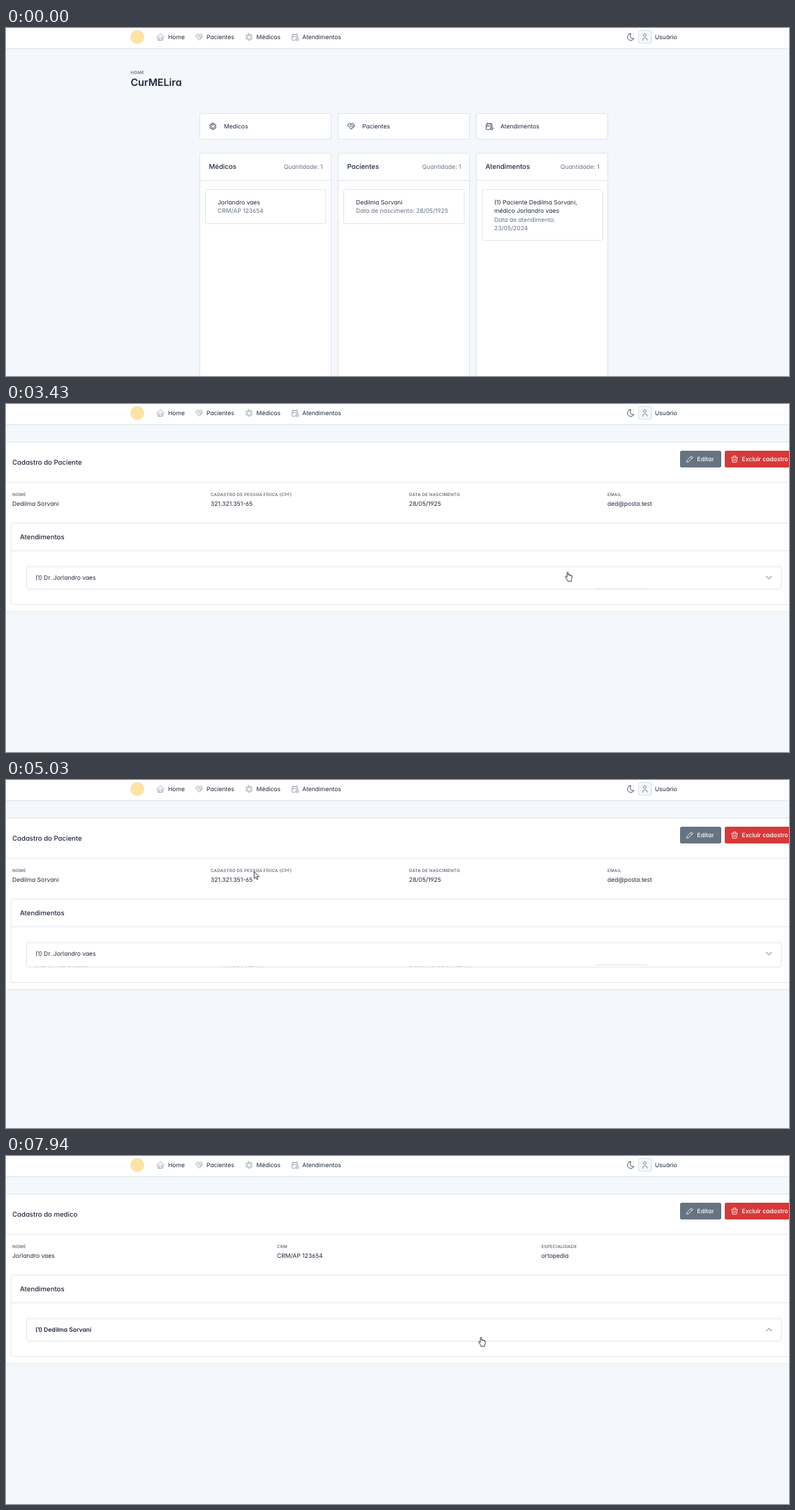
These frames come from a looping animation (1121 by 499 pixels, 8 s). An HTML page:

```html
<!DOCTYPE html>
<html lang="pt-BR">
<head>
<meta charset="utf-8">
<title>CurMELira</title>
<style>
  html, body { margin: 0; width: 100%; height: 100%; overflow: hidden; background: #f4f7fb; }
  svg { display: block; width: 1121px; height: 499px; }
  text {
    font-family: Inter, "Open Sans", sans-serif;
    font-feature-settings: "cv03", "cv04", "cv11";
    text-rendering: geometricPrecision;
    white-space: pre;
  }
</style>
</head>
<body>
<svg id="stage" viewBox="0 0 1121 499" xmlns="http://www.w3.org/2000/svg"></svg>
<script>
const INK = '#1d273b', MUTED = '#667382', EDGE = '#dfe4ea', RULE = '#b3b3b3';
const BODY = 8.54, HEAD = 9.6, SMALL = 6.1;
const DOCTOR = 'Jorlandro vaes', PATIENT = 'Dedilma Sorvani';
const LOOP = 8000;

// Six-armed medical star on a 24 unit grid
function starPath() {
  const pts = [];
  const at = (r, a) => `${(12 + r * Math.cos(a)).toFixed(2)} ${(12 + r * Math.sin(a)).toFixed(2)}`;
  for (let k = 0; k < 6; k++) {
    const a = Math.PI * (k / 3 - 0.5);
    pts.push(at(9.2, a - 0.22), at(9.2, a + 0.22), at(4, a + Math.PI / 6));
  }
  return 'M' + pts.join('L') + 'Z';
}

const ICONS = {
  home: 'M5 12H3l9-9 9 9h-2M5 12v7a2 2 0 0 0 2 2h10a2 2 0 0 0 2-2v-7M9 21v-6a2 2 0 0 1 2-2h2a2 2 0 0 1 2 2v6',
  heart: 'M19.5 12.57 12 20l-7.5-7.43A5 5 0 1 1 12 6a5 5 0 1 1 7.5 6.57M12 6 8.7 9.3a1 1 0 0 0 0 1.4l.55.55c.7.7 1.8.7 2.5 0l1-1a3.2 3.2 0 0 1 4.5 0l2.25 2.25M12.5 15.5l2 2M15 13l2 2',
  star: starPath(),
  calendar: 'M11.8 21H5a2 2 0 0 1-2-2V7a2 2 0 0 1 2-2h12a2 2 0 0 1 2 2v4M14 18a4 4 0 1 0 8 0a4 4 0 1 0-8 0M15 3v4M7 3v4M3 11h16M18 16.5V18l1 1',
  moon: 'M12 3h.4a7.5 7.5 0 0 0 7.9 12.45A9 9 0 1 1 12 3z',
  user: 'M8 7a4 4 0 1 0 8 0a4 4 0 0 0-8 0M6 21v-2a4 4 0 0 1 4-4h4a4 4 0 0 1 4 4v2',
  eye: 'M10 12a2 2 0 1 0 4 0a2 2 0 0 0-4 0M21 12c-2.4 4-5.4 6-9 6s-6.6-2-9-6c2.4-4 5.4-6 9-6s6.6 2 9 6',
  pencil: 'M4 20h4L18.5 9.5a2.83 2.83 0 1 0-4-4L4 16v4M13.5 6.5l4 4',
  trash: 'M4 7h16M10 11v6M14 11v6M5 7l1 12a2 2 0 0 0 2 2h8a2 2 0 0 0 2-2l1-12M9 7V4a1 1 0 0 1 1-1h4a1 1 0 0 1 1 1v3',
  chevron: 'M6 9l6 6 6-6'
};

// y is the middle of the capitals
const text = (x, y, str, { size = BODY, weight = 400, fill = INK, anchor = 'start', extra = '' } = {}) =>
  `<text x="${x}" y="${(y + size * 0.36).toFixed(2)}" font-size="${size}" font-weight="${weight}" fill="${fill}" text-anchor="${anchor}" ${extra}>${str}</text>`;
const label = (x, y, str) =>
  text(x, y, str, { size: SMALL, weight: 600, fill: MUTED, extra: 'letter-spacing=".24"' });
const head = (x, y, str) => text(x, y, str, { size: HEAD, weight: 500 });
const rect = (x, y, x2, y2, fill, stroke = 'none', r = 0, extra = '') =>
  `<rect x="${x}" y="${y}" width="${x2 - x}" height="${y2 - y}" rx="${r}" fill="${fill}" stroke="${stroke}" ${extra}/>`;
const line = (x, y, x2, stroke = EDGE, extra = '') =>
  `<path d="M${x} ${y}H${x2}" stroke="${stroke}" ${extra}/>`;
const icon = (name, cx, cy, color = INK, size = 12.4, extra = '') =>
  `<g transform="translate(${cx} ${cy}) scale(${size / 24})" fill="none" stroke="${color}" stroke-width="1.6" stroke-linecap="round" stroke-linejoin="round"><path d="${ICONS[name]}" transform="translate(-12 -12)" ${extra}/></g>`;
const card = (x, y, x2, y2, extra = '') => rect(x, y, x2, y2, '#fff', EDGE, 2.5, extra);
const button = (x, x2, color, str, tx, ic) =>
  rect(x, 67, x2, 91, color, 'none', 2.5) + (ic ? icon(ic, x + 14, 79, '#fff') : '') +
  text(tx, 79, str, { weight: 500, fill: '#fff' });
const viewButton = (x, y, x2) =>
  rect(x, y, x2, y + 24, '#fff', '#d9dee5', 2.5) + icon('eye', x + 14, y + 12) +
  text(x + 24.7, y + 12, 'Visualizar', { weight: 500 });

function navbar() {
  const links = [['home', 221, 232, 'Home'], ['heart', 276.5, 287, 'Pacientes'],
    ['star', 348, 358.5, 'Médicos'], ['calendar', 414, 424.3, 'Atendimentos']];
  return rect(0, 0, 1121, 29, '#fff') + line(0, 29.5, 1121) +
    '<circle cx="188" cy="13" r="10" fill="#fce2a4"/>' +
    links.map(([ic, cx, x, str]) => icon(ic, cx, 13, '#8b94a2') + text(x, 13, str)).join('') +
    icon('moon', 894.5, 13) + rect(905.5, 3.5, 924, 22, '#f4f7fb', '#d9dfe7', 2.5) +
    icon('user', 914.7, 13, MUTED) + text(929, 13, 'Usuário');
}

function homePage() {
  const cols = [
    ['star', 'Medicos', 'Médicos', 281, [DOCTOR], ['CRM/AP 123654']],
    ['heart', 'Pacientes', 'Pacientes', 281, [PATIENT], ['Data de nascimento: 28/05/1925']],
    ['calendar', 'Atendimentos', 'Atendimentos', 305, [`(1) Paciente ${PATIENT},`, `médico ${DOCTOR}`],
      ['Data de atendimento:', '23/05/2024']]
  ];
  return label(178.5, 64, 'HOME') + text(178.5, 78, 'CurMELira', { size: 14.3, weight: 600 }) +
    cols.map(([ic, link, title, bottom, main, sub], i) => {
      const x = 277.5 + 198 * i;
      const rows = main.map(s => [s, INK]).concat(sub.map(s => [s, MUTED]));
      return card(x, 122.5, x + 188, 159.5) + icon(ic, x + 18.7, 141) + text(x + 34.5, 141, link) +
        card(x, 179.5, x + 188, 520) + line(x, 218.5, x + 188) + head(x + 13, 199, title) +
        text(x + 176, 199, 'Quantidade: 1', { fill: MUTED, anchor: 'end' }) +
        card(x + 8, 231.5, x + 180.5, bottom - 0.5) +
        rows.map(([s, c], k) => text(x + 25.5, 250.2 + 12.2 * k, s, { fill: c })).join('');
    }).join('');
}

function listFrame(title, bottom, bx, add) {
  return rect(-2, 54.5, 1130, bottom, '#fff', EDGE) + line(0, 103.5, 1121) + head(9, 79, title) +
    button(bx, 1135, '#2fb344', add, bx + 10.3);
}

const rowText = (xs, y, cells, weight) =>
  cells.map((s, i) => text(xs[i], y, s, { weight })).join('');

function plainList(title, bx, add, xs, names, cells) {
  return listFrame(title, 192.5, bx, add) + rect(12, 143, 1121, 177, '#f8f8f8') +
    line(12, 143, 1121, RULE) + rowText(xs, 130.5, names, 700) + rowText(xs, 160.2, cells, 400) +
    viewButton(1046.5, 148.5, 1130);
}

function richList(title, bx, add, xs, names, cells, split, sorts) {
  const arrows = sorts.map((x, i) => i
    ? `<path d="M${x - 2.8} 158l2.8-4.2 2.8 4.2zM${x - 2.8} 159.8l2.8 4.2 2.8-4.2z" fill="#d6d6d8"/>`
    : `<path d="M${x - 3.2} 158.4l3.2-5 3.2 5z" fill="#555a66"/>`).join('');
  const pages = [[913, 'Primeiro'], [966, 'Anterior'], [1040.5, 'Próximo'], [1092.5, 'Último']];
  return listFrame(title, 252.5, bx, add) +
    text(12, 132, 'Exibir') + rect(37, 122.5, 72.5, 140, '#fff', '#999', 2) + text(41.5, 132, '10') +
    '<path d="M62.6 130l2.7 2.7 2.7-2.7" fill="none" stroke="#222" stroke-width="1.3"/>' +
    text(75, 132, 'resultados por página') + text(957.5, 131.3, 'Pesquisar') +
    rect(999.5, 121.5, 1130, 141, '#fff', '#aaa', 2) + text(1003, 131.3, 'Buscar registros', { fill: '#7c8088' }) +
    rowText(xs, 159, names, 700) + arrows +
    rect(12, 172, 1121, 206, '#f9f9f9', 'none', 0, 'class="row"') +
    rect(12, 172, split, 206, '#f1f1f1', 'none', 0, 'class="cell"') +
    line(12, 171.5, 1121, RULE) + line(12, 206.5, 1121, RULE) +
    rowText(xs, 189, cells, 400) + viewButton(1046.5, 177, 1130) +
    text(12, 223.5, 'Mostrando de 1 até 1 de 1 registros', { fill: '#333' }) +
    pages.map(([x, s]) => text(x, 223.5, s, { fill: '#929292' })).join('') +
    rect(1009, 213, 1030, 234, 'url(#page)', '#aaa', 1.5) +
    text(1019.5, 223.5, '1', { anchor: 'middle', fill: '#333' });
}

function detailPage(title, fields, item, body) {
  return rect(-2, 54.5, 1130, 297.5, '#fff', EDGE, 0, 'class="sheet"') + line(0, 112, 1121) + head(9, 83.5, title) +
    button(965, 1024, MUTED, 'Editar', 989.5, 'pencil') +
    button(1029, 1135, '#d63939', 'Excluir cadastro', 1053.5, 'trash') +
    fields.map(([x, k, v]) => label(x, 129.5, k) + text(x, 142.8, v)).join('') +
    card(7, 170.5, 1140, 287.5, 'class="outer"') + head(20, 191, 'Atendimentos') + line(7, 210.5, 1121) +
    card(29.5, 233, 1110, 265.5, 'class="item"') +
    text(42, 249, item, { extra: 'class="title"' }) + icon('chevron', 1092.3, 249, '#4a5568', 14, 'class="arrow"') +
    `<g clip-path="url(#fold)">${body}</g>`;
}

const visit = [[42, 'DATA DO ATENDIMENTO', '23/05/2024'], [309.5, 'NOME DO MÉDICO', DOCTOR],
  [577, 'ESPECIALIDADE DO MÉDICO', 'ortopedia']]
  .map(([x, k, v]) => label(x, 269.7, k) + text(x, 282.5, v)).join('') + viewButton(844.5, 265, 919.5);

const patientList = ['Lista de pacientes', 1010.5, 'Adicionar novo paciente'];
const doctorList = ['Lista de medicos', 1015.5, 'Adicionar novo Médico'];
const patientHead = ['Nome', 'CPF', 'Email', 'Data de nascimento'];
const patientRow = [PATIENT, '321.321.351-65', 'ded@posta.test', '28/05/1925'];
const doctorHead = ['Nome', 'CRM', 'Especialidade'];
const doctorRow = [DOCTOR, 'CRM/AP 123654', 'ortopedia'];

// Start time, kind, markup
const pages = [
  [0, 'home', homePage()],
  [1440, 'plain', plainList(...patientList, [17.5, 233, 428.5, 638], patientHead, patientRow)],
  [1590, 'list', richList(...patientList, [17.5, 227, 417, 620], patientHead, patientRow, 221,
    [209.5, 399.5, 602.5, 885.5, 1117])],
  [3030, 'detail', detailPage('Cadastro do Paciente', [[9, 'NOME', PATIENT],
    [293, 'CADASTRO DE PESSOA FÍSICA (CPF)', patientRow[1]], [577, 'DATA DE NASCIMENTO', patientRow[3]],
    [861, 'EMAIL', patientRow[2]]], `(1) Dr. ${DOCTOR}`, visit)],
  [5760, 'plain', plainList(...doctorList, [17.5, 271, 540], doctorHead, doctorRow)],
  [5890, 'list', richList(...doctorList, [17.5, 271, 540], doctorHead, doctorRow, 264.5,
    [254, 523, 811.5, 1117])],
  [7470, 'detail', detailPage('Cadastro do medico', [[9, 'NOME', DOCTOR], [388, 'CRM', doctorRow[1]],
    [766.5, 'ESPECIALIDADE', doctorRow[2]]], `(1) ${PATIENT}`, '')]
];

// Pointer tip: time, x, y
const track = [
  [70, 1072, 494], [300, 860, 300], [560, 570, 110], [840, 380, 14], [1000, 305, 11], [1380, 303, 11],
  [1510, 294.5, 33.5], [1710, 300, 112], [1850, 340, 138], [2150, 620, 192], [2400, 900, 196],
  [2570, 1034, 190], [2680, 1053.5, 187], [3030, 1053.5, 187], [3200, 1000, 215], [3430, 805, 241],
  [3640, 610, 252], [3830, 462, 255], [3990, 437.5, 257], [4800, 437.5, 257], [4900, 415, 215],
  [5030, 355, 131.5], [5180, 352, 60], [5340, 371, 11], [5780, 373, 10], [5960, 398, 35.5],
  [6200, 450, 105], [6550, 600, 176], [6750, 760, 240], [6950, 980, 215], [7100, 1055, 188],
  [7480, 1055, 188], [7650, 920, 225], [7820, 720, 255], [7920, 680, 260], [8000, 680, 260]
];

const stage = document.getElementById('stage');
stage.innerHTML =
  '<defs><linearGradient id="page" x2="0" y2="1"><stop stop-color="#fff"/><stop offset="1" stop-color="#e6e6e6"/></linearGradient>' +
  '<clipPath id="fold"><rect id="foldBox" x="29" y="233" width="1082" height="32"/></clipPath></defs>' +
  rect(0, 0, 1121, 499, '#f4f7fb') + pages.map(p => `<g class="page">${p[2]}</g>`).join('') + navbar() +
  '<g id="pointer" fill="#fff" stroke="#111" stroke-width="1.3" stroke-linejoin="round">' +
  '<path id="arrow" transform="scale(.61)" d="M.5.5V17l3.8-3.6 2.6 5.8 2.6-1.2-2.6-5.6h5.3z"/>' +
  '<path id="hand" transform="scale(.61) translate(-6.5 -1)" d="M5 13V2.5a1.5 1.5 0 0 1 3 0V8a1.5 1.5 0 0 1 3 0v1a1.5 1.5 0 0 1 3 0v1a1.3 1.3 0 0 1 2.6.3V15c0 2-1.6 3-1.6 5v2.5H6.5V20L1.2 13.2a1.6 1.6 0 0 1 2.4-2.1z"/></g>';

const groups = [...stage.querySelectorAll('.page')];
const byId = id => document.getElementById(id);
const show = (el, on) => el.setAttribute('display', on ? 'inline' : 'none');

// CSS "ease" curve
function ease(x) {
  if (x <= 0) return 0;
  if (x >= 1) return 1;
  const bez = (u, a, b) => 3 * u * (1 - u) * (1 - u) * a + 3 * u * u * (1 - u) * b + u * u * u;
  let lo = 0, hi = 1;
  for (let i = 0; i < 20; i++) {
    const mid = (lo + hi) / 2;
    if (bez(mid, 0.25, 0.25) < x) lo = mid; else hi = mid;
  }
  return bez(lo, 0.1, 1);
}

function pointerAt(t) {
  const i = track.findIndex(k => k[0] > t);
  if (i < 0) return track[track.length - 1].slice(1);
  if (i === 0) return null;
  const [t0, x0, y0] = track[i - 1], [t1, x1, y1] = track[i];
  const p = (t - t0) / (t1 - t0);
  return [x0 + (x1 - x0) * p, y0 + (y1 - y0) * p];
}

function isLink(kind, x, y) {
  if (y < 24) return x > 214 && x < 482;
  if (kind === 'list') return x > 1046 && y > 177 && y < 201;
  if (kind === 'detail') return x > 29 && x < 1110 && y > 233 && y < 265;
  return false;
}

function drawFold(group, t) {
  const open = (t >= 4130 && t < 4800) || t >= 7935;
  const bottom = 265.5 + 35.5 * (ease((t - 4130) / 350) - ease((t - 4800) / 350));
  const setBottom = (name, top, y) => group.querySelector(name).setAttribute('height', y - top);
  setBottom('.sheet', 54.5, bottom + 32.3);
  setBottom('.outer', 170.5, bottom + 22);
  setBottom('.item', 233, bottom);
  byId('foldBox').setAttribute('height', bottom - 233.5);
  group.querySelector('.title').setAttribute('font-weight', open ? 600 : 400);
  const turn = 180 * (ease((t - 4110) / 120) - ease((t - 4800) / 200)) + (t >= 7935 ? 180 : 0);
  group.querySelector('.arrow').setAttribute('transform', `rotate(${turn}) translate(-12 -12)`);
}

function draw(t) {
  let n = pages.length - 1;
  while (pages[n][0] > t) n--;
  groups.forEach((g, i) => show(g, i === n));
  const kind = pages[n][1], pos = pointerAt(t);
  show(byId('pointer'), pos);
  if (pos) {
    const [x, y] = pos, link = isLink(kind, x, y);
    byId('pointer').setAttribute('transform', `translate(${x.toFixed(2)} ${y.toFixed(2)})`);
    show(byId('hand'), link);
    show(byId('arrow'), !link);
    if (kind === 'list') {
      const over = y > 172 && y < 206;
      groups[n].querySelector('.row').setAttribute('fill', over ? '#f6f6f6' : '#f9f9f9');
      groups[n].querySelector('.cell').setAttribute('fill', over ? '#eaeaea' : '#f1f1f1');
    }
  }
  if (kind === 'detail') drawFold(groups[n], t);
}

const start = performance.now();
function tick() {
  draw((performance.now() - start) % LOOP);
  requestAnimationFrame(tick);
}
tick();
</script>
</body>
</html>
```
